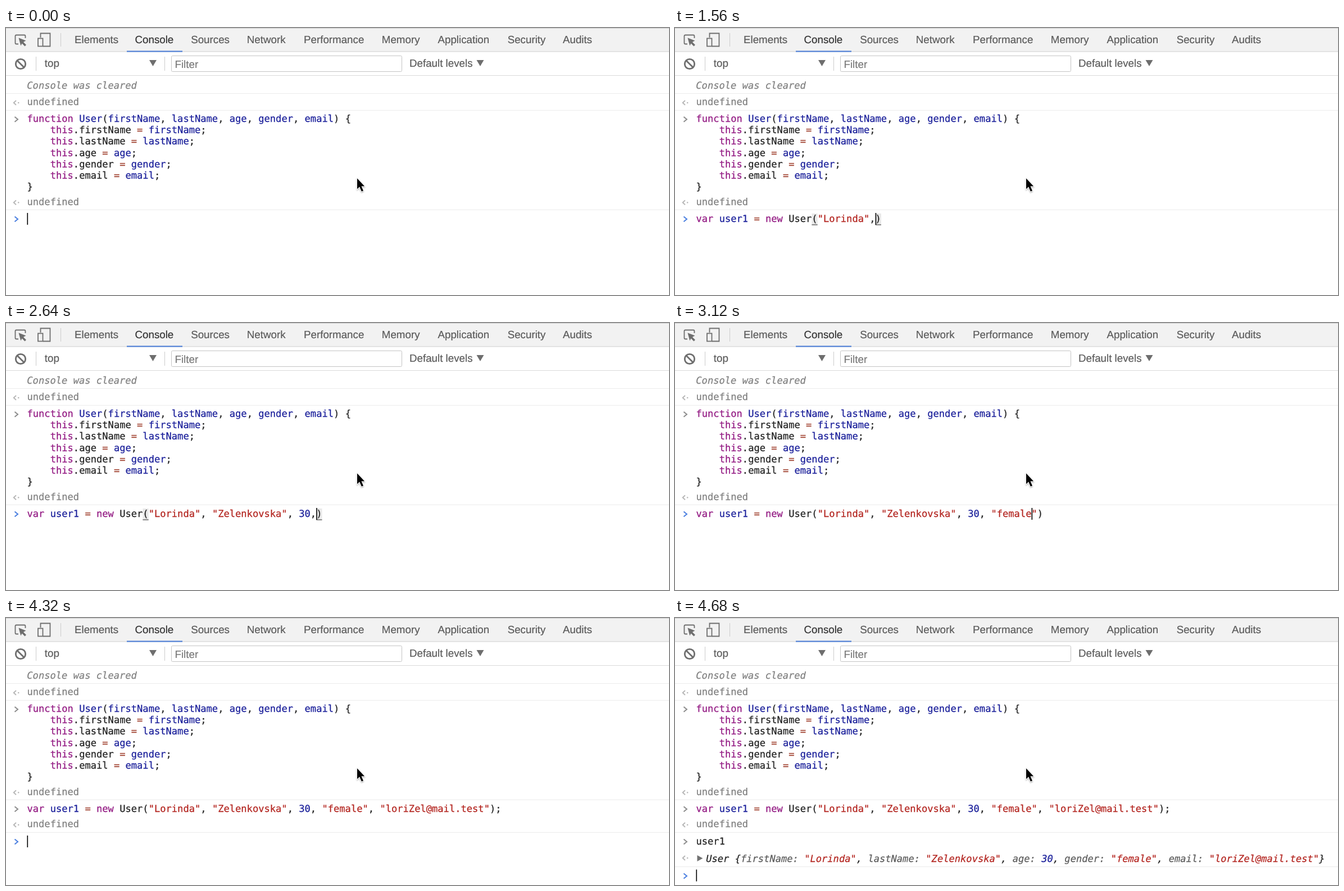
An HTML page that plays this animation: 1180x475 px, repeating every 5.68 s.

```html
<!DOCTYPE html>
<html lang="en">
<head>
<meta charset="utf-8">
<title>Console typing</title>
<style>
html, body { margin: 0; width: 100%; height: 100%; overflow: hidden; background: #fff; }
svg { display: block; width: 1180px; height: 475px; }
text { white-space: pre; text-rendering: geometricPrecision; }
.ui { font: 18.75px "Liberation Sans", Arial, sans-serif; stroke-width: .2; }
.code { font: 17.1px "DejaVu Sans Mono", Menlo, monospace; stroke-width: .25; }
.it { font-style: italic; }
.line { fill: none; stroke-width: 2; }
</style>
</head>
<body>
<svg id="stage" viewBox="0 0 1180 475" xmlns="http://www.w3.org/2000/svg">
  <rect width="1180" height="475" fill="#fff"/>
  <rect width="1180" height="42" fill="#f2f2f2"/>
  <path d="M0 .5H1180M0 42H1180" stroke="#cdcdcd"/>
  <path d="M0 84.5H1180" stroke="#dadada"/>
  <rect x="215" y="40.5" width="99" height="2.2" fill="#5584d8"/>
  <path d="M97.5 9V33M53.5 51V76M282.5 51V76" stroke="#ccc"/>

  <g fill="none" stroke="#6e6e6e" stroke-width="1.8">
    <path d="M22 28.5H18.5Q16.5 28.5 16.5 26.5V14.5Q16.5 12.5 18.5 12.5H32.5Q34.5 12.5 34.5 14.5V18"/>
    <path d="M61.5 17V9.5H78.5V32.5H66"/>
    <rect x="57" y="18.5" width="8.5" height="14"/>
    <g stroke-width="2.8">
      <circle cx="26" cy="64" r="8.7"/>
      <path d="M20 58L32 70"/>
    </g>
  </g>
  <path d="M22.5 17.5L35.5 22.5L31 25L36 30L33.5 32.5L28.5 27.5L26.3 31.5Z" fill="#6e6e6e"/>
  <path d="M255 57H268L261.5 68ZM837.5 57H850.5L844 68Z" fill="#6e6e6e"/>
  <rect x="294.5" y="49.5" width="410" height="28" rx="2" fill="#fff" stroke="#c4c4c4"/>

  <g id="tabs"></g>
  <g id="fixed"></g>
  <g id="live"></g>

  <defs>
    <filter id="shade" x="-50%" y="-50%" width="200%" height="200%">
      <feDropShadow dx="0" dy="1.5" stdDeviation="1.3" flood-opacity=".35"/>
    </filter>
  </defs>
  <path d="M625 267.5V286.5L629.2 282.6L632.8 290.8L636 289.4L632.5 281.5H638.2Z" fill="#000"
    stroke="#fff" stroke-width="1.6" paint-order="stroke" filter="url(#shade)"/>
</svg>
<script>
const FRAME = 120, LOOP = 5680, LAST = 39;
const LEFT = 37.5, CHAR = 17.1 * 0.602;
const first = "Lorinda", last = "Zelenkovska", mail = "loriZel@mail.test";
const command = `var user1 = new User("${first}", "${last}", 30, "female", "${mail}");`;
const fields = ["firstName", "lastName", "age", "gender", "email"];
const colors = { key: "#931a83", str: "#b3241f", def: "#1a1f9a", op: "#a0402f", dim: "#808080", blue: "#4a7fe0" };
// [step, characters typed]
const pace = [[0, 0], [8, 21], [13, 31], [22, 50], [26, 58], [35, 82]];

const $ = id => document.getElementById(id);
const ink = c => `fill="${c}" stroke="${c}"`;
const span = (s, c) => c ? `<tspan ${ink(c)}>${s}</tspan>` : s;
const text = (x, y, s, cls = "code", c = "#222") => `<text x="${x}" y="${y}" class="${cls}" ${ink(c)}>${s}</text>`;
const label = (x, y, s, c = "#5a5a5a") => text(x, y, s, "ui", c);
const rule = y => `<path d="M0 ${y + 0.5}H1180" stroke="#ececec"/>`;
const prompt = (y, color) => `<path class="line" d="M15.5 ${y - 4.5}L21 ${y}L15.5 ${y + 4.5}" stroke="${color}"/>`;
const reply = y => `<path class="line" d="M18 ${y - 4}L13.8 ${y}L18 ${y + 4}" stroke="#b8b8b8"/>` +
  `<circle cx="22.2" cy="${y}" r="1.3" fill="#b8b8b8"/>`;
const caret = (y, n = 0) => `<rect x="${LEFT + n * CHAR}" y="${y - 10.5}" width="1.6" height="21" fill="#000"/>`;
const outcome = y => reply(y + 1) + text(LEFT, y + 5.4, "undefined", "code", colors.dim);

function paint(code) {
  let prev = "";
  return code.replace(/"[^"]*"?|[A-Za-z]\w*|\d+|[^\s]/g, w => {
    let c = "";
    if (w[0] === '"') c = colors.str;
    else if (/^(var|new|function|this)$/.test(w)) c = colors.key;
    else if (w === "=") c = colors.op;
    else if (/^\d/.test(w) || /^(var|function)$/.test(prev) || (fields.includes(w) && prev !== ".")) c = colors.def;
    prev = w;
    return span(w, c);
  });
}

function typedCount(step) {
  const i = pace.findIndex(p => p[0] >= step);
  if (i < 1) return i ? command.length : 0;
  const [a, m] = pace[i - 1], [b, n] = pace[i];
  return Math.round(m + (n - m) * (step - a) / (b - a));
}

// Editor closes quotes and brackets ahead of the caret.
function typing(n) {
  let s = command.slice(0, n);
  if (s.split('"').length % 2 === 0) s += '"';
  if (s.includes("(") && !s.includes(")")) s += ")";
  let marks = "";
  if (/[()]/.test(s[n - 1] || "") || s[n] === ")") {
    for (const k of [s.indexOf("("), s.indexOf(")")]) {
      const x = LEFT + k * CHAR;
      marks += `<rect x="${x}" y="330" width="${CHAR}" height="20" fill="#e9e9e9"/>` +
        `<rect x="${x}" y="349.5" width="${CHAR}" height="1.3" fill="#555"/>`;
    }
  }
  return marks + prompt(340, colors.blue) + text(LEFT, 345, paint(s)) + caret(339.5, n);
}

function preview() {
  const values = [`"${first}"`, `"${last}"`, "30", '"female"', `"${mail}"`];
  const body = fields.map((f, i) =>
    span(f + ":", "#5c5c5c") + " " + span(values[i], i === 2 ? colors.def : colors.str)).join(", ");
  return reply(427) + `<path d="M39.5 422V433L49.5 427.5Z" fill="#727272"/>` +
    text(55.2, 433.5, `User {${body}}`, "code it");
}

function scene(step) {
  if (step < 36) return typing(typedCount(step));
  let s = prompt(340, "#8c8c8c") + text(LEFT, 345, paint(command)) + outcome(367) + rule(381);
  if (step < LAST) {
    const n = [0, 3, 5][step - 36];
    return s + prompt(398, colors.blue) + text(LEFT, 403, "user1".slice(0, n)) + caret(397.5, n);
  }
  return s + prompt(398, "#8c8c8c") + text(LEFT, 403, "user1") + preview() + rule(442) +
    prompt(459, colors.blue) + caret(458);
}

const tabs = [["Elements", 122], ["Console", 229.5], ["Sources", 329.2], ["Network", 428.8], ["Performance", 530],
  ["Memory", 668.8], ["Application", 768.5], ["Security", 892.7], ["Audits", 991]];
$("tabs").innerHTML = tabs.map(([s, x]) => label(x, 27, s, s === "Console" ? "#333" : undefined)).join("") +
  label(68.8, 69, "top") + label(300.5, 70.7, "Filter", "#777") + label(718, 69, "Default levels");

const listing = ["function User(" + fields.join(", ") + ") {", ...fields.map(f => `    this.${f} = ${f};`), "}"];
$("fixed").innerHTML = text(37.3, 108, "Console was cleared", "code it", colors.dim) +
  rule(116) + outcome(132) + rule(146) + prompt(162.5, "#8c8c8c") +
  listing.map((s, i) => text(LEFT, 167 + i * 20.22, paint(s))).join("") +
  outcome(309.5) + rule(323);

let shown = -1;
function draw(t) {
  const step = Math.min(LAST, Math.floor(t % LOOP / FRAME));
  if (step !== shown) $("live").innerHTML = scene(shown = step);
}
const start = performance.now();
function tick() {
  draw(performance.now() - start);
  requestAnimationFrame(tick);
}
tick();
</script>
</body>
</html>
```
